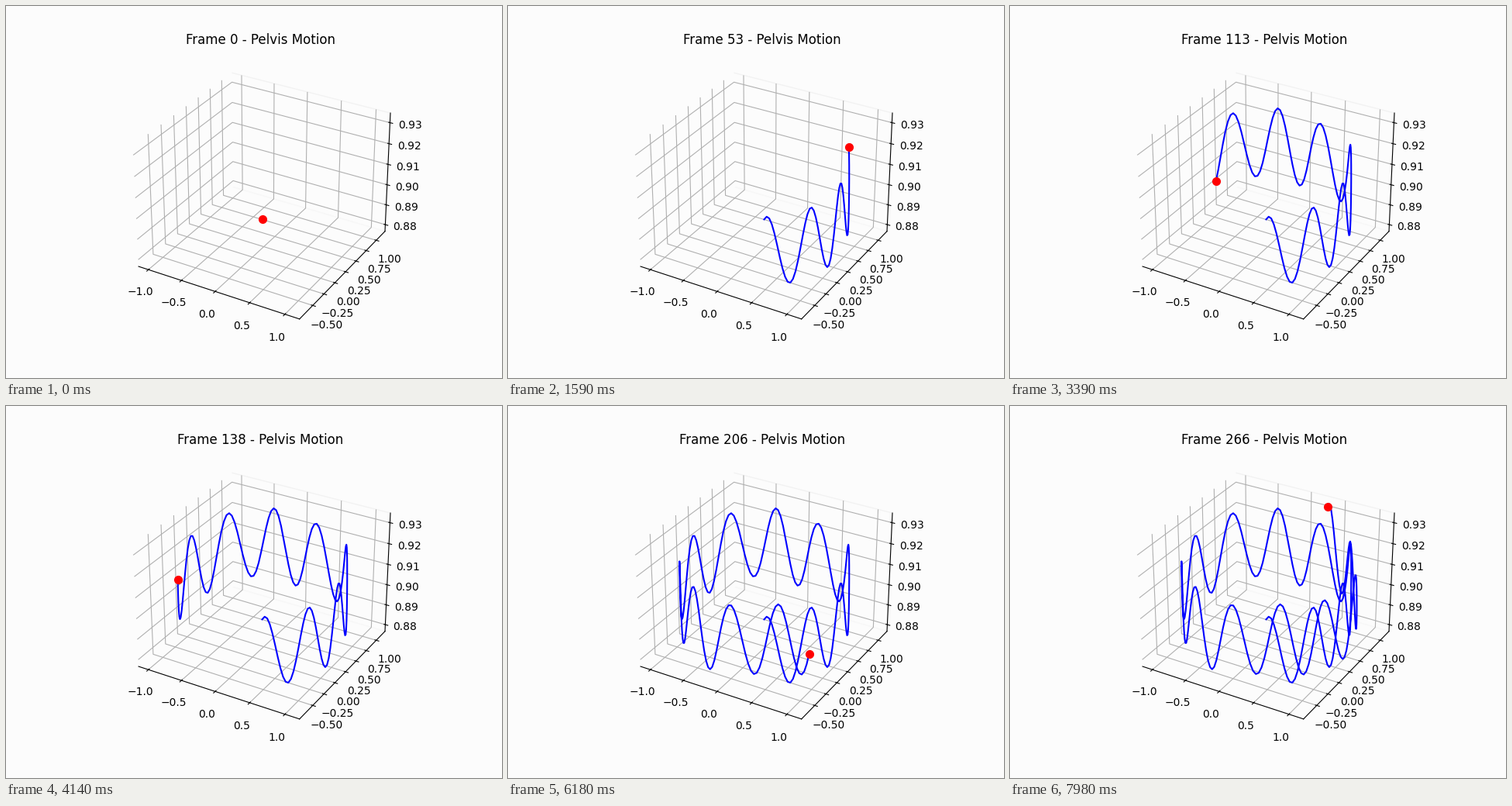
Recreate the animation shown at these times as a matplotlib script. Size 640x480 px, loop 8 s.

```python
import numpy as np
import matplotlib.pyplot as plt
from matplotlib.animation import FuncAnimation

W, H, DPI = 640, 480, 100
FRAMES, STEP_MS = 267, 30
PAPER = "#fcfcfc"

# The walk's mean path round the room, evenly spaced in time
PATH_X = [330, 391.5, 431, 436, 385, 325.5, 262.5, 224, 228, 268.5, 334.5,
          397, 444, 438.5, 409]
PATH_Y = [317, 304, 269, 216, 191, 174, 194, 230, 264, 298, 300,
          298, 265, 219, 166]

# Each stride lifts and drops the pelvis once
STRIDE, FIRST_PEAK, BOB = 17.55, 1, 45


def spline(keys, n):
    """Sample a Catmull-Rom curve through evenly spaced keys n times."""
    keys = np.asarray(keys, float)
    slope = np.gradient(keys)
    u = np.linspace(0, len(keys) - 1, n)
    i = np.minimum(u.astype(int), len(keys) - 2)
    s = u - i
    r = 1 - s
    return (keys[i] * (1 + 2 * s) * r**2 + keys[i + 1] * s**2 * (3 - 2 * s)
            + s * r * (slope[i] * r - slope[i + 1] * s))


phase = 2 * np.pi * (np.arange(FRAMES) - FIRST_PEAK) / STRIDE
px = spline(PATH_X, FRAMES) + 0.5
py = spline(PATH_Y, FRAMES) - BOB * np.cos(phase) + 0.5

fig = plt.figure(figsize=(W / DPI, H / DPI), dpi=DPI, facecolor=PAPER)

ax = fig.add_subplot(projection="3d")
ax.set_facecolor(PAPER)
ax.set_xlim(-1.151, 1.203)
ax.set_ylim(-0.788, 1.224)
ax.set_zlim(0.8766, 0.93455)
ax.set_xticks(np.linspace(-1, 1, 5))
ax.set_yticks(np.linspace(-0.5, 1, 7))
ax.set_zticks(np.linspace(0.88, 0.93, 6))
for axis, edge in ((ax.xaxis, PAPER), (ax.yaxis, "#e9e9e9"), (ax.zaxis, PAPER)):
    axis.pane.set_facecolor(PAPER)
    axis.pane.set_edgecolor(edge)
title = ax.set_title("")

# Overlay measured in stage pixels
stage = fig.add_axes([0, 0, 1, 1])
stage.set(xlim=(0, W), ylim=(H, 0))
stage.axis("off")
trail, = stage.plot([], [], "b-", lw=1.5)
dot, = stage.plot([], [], "ro", ms=7)


def update(k):
    title.set_text(f"Frame {k} - Pelvis Motion")
    trail.set_data(px[:k + 1], py[:k + 1])
    dot.set_data(px[k:k + 1], py[k:k + 1])
    return title, trail, dot


anim = FuncAnimation(fig, update, frames=FRAMES, init_func=lambda: update(0),
                     interval=STEP_MS, repeat=True, repeat_delay=0)
plt.show()
```
